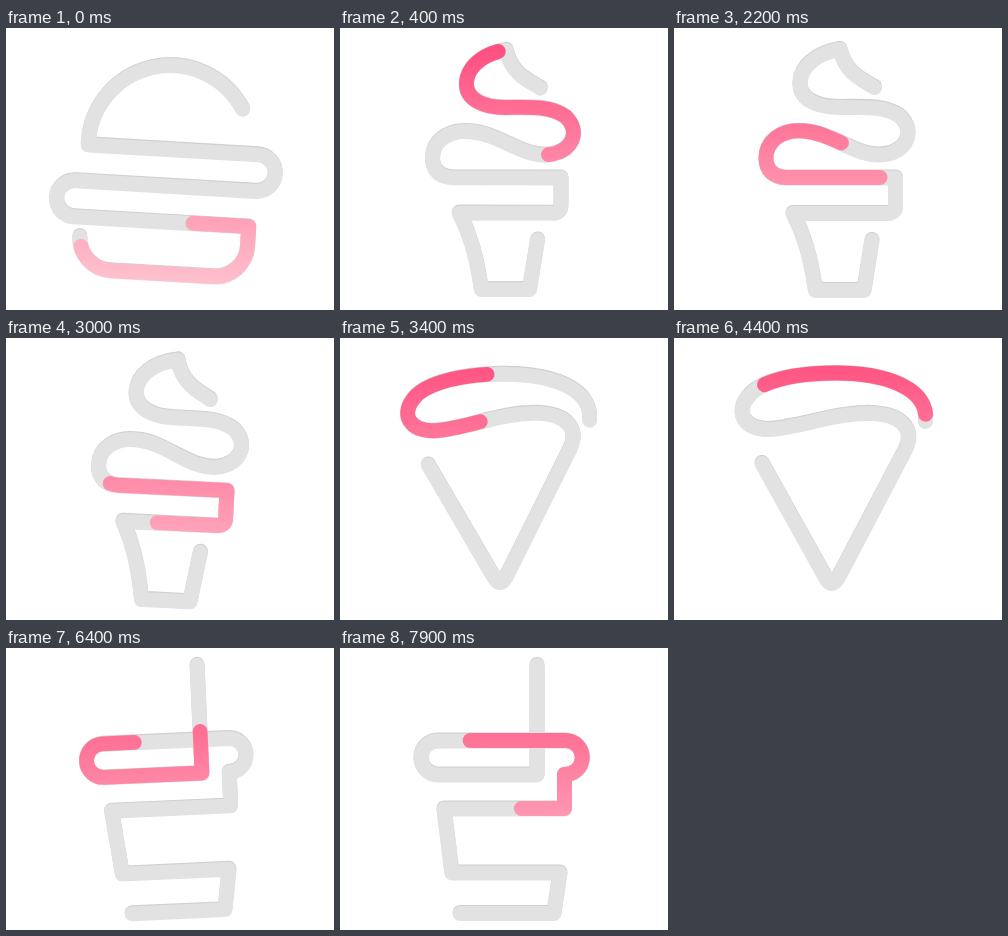
Write an HTML page that moves like this. It is 328 px wide and 282 px high and loops after 8 s.

```html
<!DOCTYPE html>
<html lang="en">
<head>
<meta charset="utf-8">
<title>Snack loader</title>
<style>
  html, body { margin: 0; width: 100%; height: 100%; overflow: hidden; background: #fff; }
  svg { display: block; width: 328px; height: 282px; }
  path { fill: none; stroke-width: 15; stroke-linecap: round; stroke-linejoin: round; }
  #edge { stroke: #d0d0d0; }
  #track { stroke: #e2e2e2; }
  #runner { stroke: url(#pink); stroke-dasharray: .25 .75; }
</style>
</head>
<body>
<svg viewBox="0 0 328 282">
  <defs>
    <linearGradient id="pink" gradientUnits="userSpaceOnUse" x1="0" y1="20" x2="0" y2="265">
      <stop stop-color="#ff5080"/>
      <stop offset="1" stop-color="#ffc6d2"/>
    </linearGradient>
  </defs>
  <g id="item">
    <path id="edge" transform="translate(0 -.6)"/>
    <path id="track" transform="translate(0 .5)"/>
    <path id="runner" pathLength="1"/>
  </g>
</svg>
<script>
const LOOP = 8000, PERIOD = 3010, FIRST_SWAP = 220;
const EXIT = 500, LAP = 6000, SWING = 60;

// tail: where the runner's tail sits at time zero, as a fraction of the path
const items = [
  { tail: .74, d: 'M233 76.3A82 82 0 0 0 81 121H251A18.3 18.3 0 0 1 251 157.6H70.5A18 18 0 0 0 70.5 193.6' +
      'H246V213A32.5 32.5 0 0 1 213.5 245.5H110.5A32.5 32.5 0 0 1 78 213' },
  { tail: .237 - 1400 / LAP, d: 'M200.5 59C188 51 172 46 166 21C140 25 127 40 126 54C125 72 145 79 165 79' +
      'C190 79 210 77 226 88C242 104 232 122 212 126C185 131 160 105 130 103C105 101 92 115 92 130' +
      'C92 143 100 149 112 149.5H221.5V178Q221.5 185 213 185H119C129 205 136 225 141.5 262H190L198 212' },
  { tail: .007 - 1, d: 'M88 125L151.5 239Q158 251 164.5 239L231 112C242 90 226 76 198 75' +
      'C160 74 125 90 95 91C70 91 62 75 73 60C85 42 125 35 162 35C215 35 255 52 251.5 83' },
  { tail: .0745 - 6400 / LAP, d: 'M197 17V126.5H98A17 17 0 0 1 98 92.5H226A17 17 0 0 1 224.5 126.5' +
      'V160.5H104L112 224.5H220L214 265H120' }
];

const [item, edge, track, runner] =
  ['item', 'edge', 'track', 'runner'].map(id => document.getElementById(id));
let shown = -1;

function show(index) {
  if (index === shown) return;
  shown = index;
  for (const path of [edge, track, runner]) path.setAttribute('d', items[index].d);
}

function draw(now) {
  const t = now % LOOP;
  const index = Math.floor((t - FIRST_SWAP) / PERIOD) + 1;
  const left = FIRST_SWAP + index * PERIOD - t;
  const age = PERIOD - left;
  show(index);

  // Swing in like a damped spring, speed up on the way out
  const enter = index ? -Math.exp(-age / 120) * Math.cos(2 * Math.PI * age / 720) : 0;
  const leave = Math.max(0, 1 - left / EXIT) ** 5;
  const scale = index ? 1 - .15 * Math.exp(-age / 60) : 1;
  item.setAttribute('transform',
    `translate(160 140) rotate(${SWING * (enter + leave)}) scale(${scale}) translate(-160 -140)`);

  const tail = items[index].tail + t / LAP;
  runner.setAttribute('stroke-dashoffset', 1 - (tail - Math.floor(tail)));
}

const start = performance.now();
function tick() {
  draw(performance.now() - start);
  requestAnimationFrame(tick);
}
tick();
</script>
</body>
</html>
```
